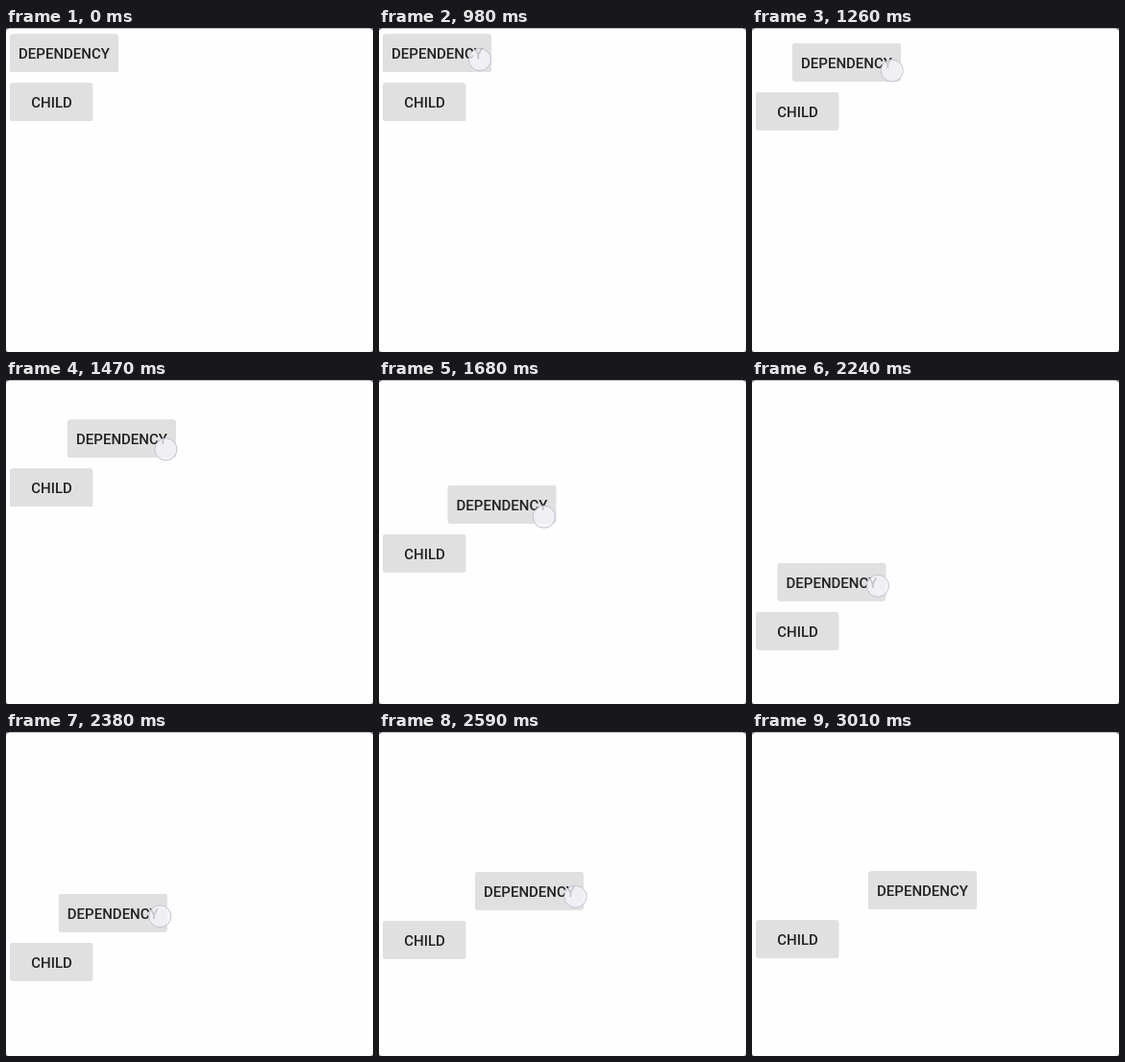
An HTML page that plays this animation: 382 px wide and 338 px high, repeating every 3500 ms.

```html
<!DOCTYPE html>
<html lang="en">
<head>
<meta charset="utf-8">
<title>Dependent drag</title>
<style>
  html, body { margin: 0; width: 100%; height: 100%; overflow: hidden; background: #fefefe; }
  svg { display: block; }
  text { font: 500 15px Roboto, sans-serif; fill: #222; text-anchor: middle; }
  .button { fill: #e0e0e0; filter: drop-shadow(0 .5px .7px rgba(0, 0, 0, .2)); }
</style>
</head>
<body>
<svg width="382" height="338" viewBox="0 0 382 338">
  <path d="M0 0H382V338H0Z M3 1Q0 1 0 4V335Q0 338 3 338H379Q382 338 382 335V4Q382 1 379 1Z" fill="#777" fill-rule="evenodd"/>
  <path d="M3 .5H379" stroke="#c9c9c9"/>
  <g id="child">
    <rect class="button" x="4.2" y="57.5" width="86" height="39.5" rx="2.5"/>
    <text x="47.5" y="83.2">CHILD</text>
  </g>
  <g id="dependency">
    <rect class="button" x="4.2" y="6.5" width="112.5" height="39.5" rx="2.5"/>
    <text x="60.5" y="32.2">DEPENDENCY</text>
  </g>
  <circle id="touch" r="11.5" fill="#f4f4fa" fill-opacity=".78" stroke="#c3c3d0"/>
</svg>
<script>
const LOOP = 3500, STEP = 70, TOUCH_START = 980, TOUCH_END = 3010, TOUCH_LEAD = 20;

// Drag path: time, x offset, y offset
const path = [
  [1050, 0, 0], [1120, 10, 1], [1260, 38, 9.5], [1470, 60, 35], [1610, 66, 76],
  [1680, 67.5, 103.5], [1890, 55, 163], [2100, 22, 187], [2170, 19.5, 187.5],
  [2240, 22.5, 184.5], [2450, 66, 152], [2590, 96, 139.5], [2730, 115, 139], [2870, 117, 139]
];
const last = path.length - 1;
const $ = id => document.getElementById(id);

function slope(i, axis) {
  if (i === 0 || i === last) return 0;
  const a = path[i - 1], b = path[i + 1];
  return (b[axis] - a[axis]) / (b[0] - a[0]);
}

// Cubic Hermite interpolation through the path points
function offset(t, axis) {
  if (t <= path[0][0]) return path[0][axis];
  if (t >= path[last][0]) return path[last][axis];
  const i = path.findIndex(p => p[0] > t) - 1;
  const a = path[i], b = path[i + 1], span = b[0] - a[0], u = (t - a[0]) / span;
  const ease = u * u * (3 - 2 * u);
  return a[axis] + (b[axis] - a[axis]) * ease
    + span * u * (1 - u) * (slope(i, axis) * (1 - u) - slope(i + 1, axis) * u);
}

function move(id, x, y) {
  $(id).setAttribute("transform", `translate(${x} ${y})`);
}

function draw(now) {
  const t = Math.floor(now % LOOP / STEP) * STEP;
  const x = offset(t, 1), y = offset(t, 2), ahead = t + TOUCH_LEAD;
  move("dependency", x, y);
  move("child", 0, y);
  move("touch", 105 + offset(ahead, 1), 33 + offset(ahead, 2));
  $("touch").style.display = t >= TOUCH_START && t < TOUCH_END ? "" : "none";
}

const start = performance.now();
function tick() {
  draw(performance.now() - start);
  requestAnimationFrame(tick);
}
tick();
</script>
</body>
</html>
```
